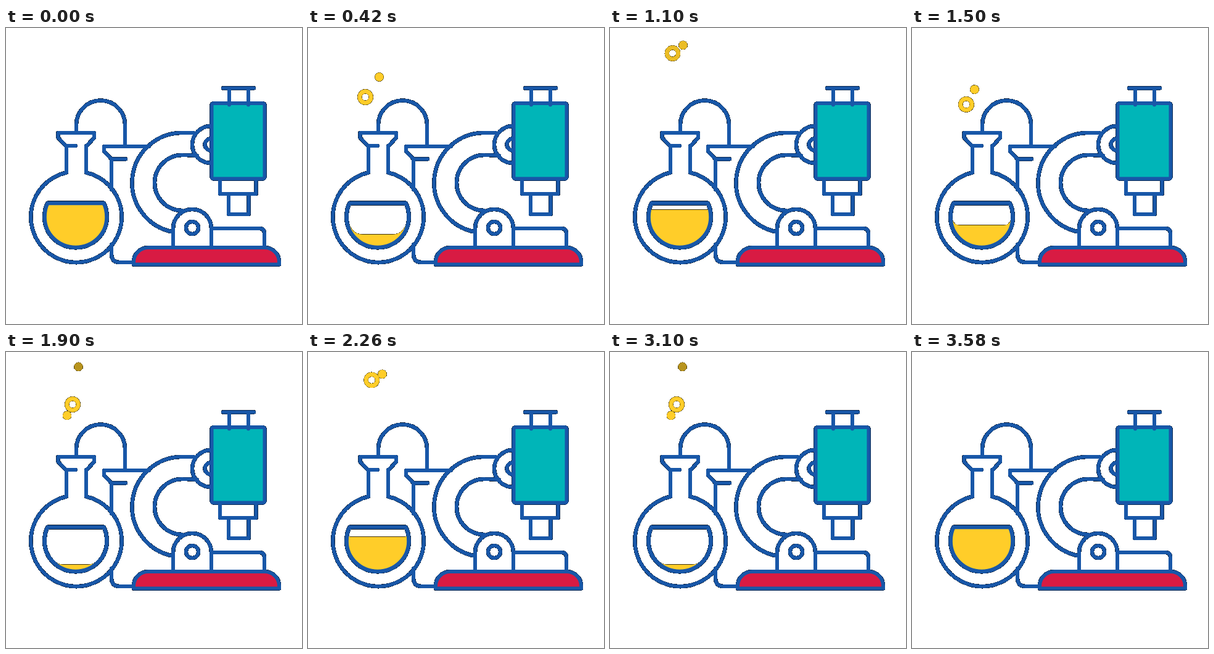
Write an HTML page that moves like this. It is 480 by 480 pixels and loops after 3600 ms.

```html
<!DOCTYPE html>
<html lang="en">
<head>
<meta charset="utf-8">
<title>Laboratory</title>
<style>
  html, body { margin: 0; width: 100%; height: 100%; overflow: hidden; background: #fff; }
  svg { display: block; width: 100vw; height: 100vh; }
  .line { fill: none; stroke: #1857a8; stroke-width: 6; stroke-linecap: round; stroke-linejoin: round; }
  .gold { fill: #ffcd29; }
  .ring { fill: none; stroke: #ffcd29; stroke-width: 7; }
</style>
</head>
<body>
<svg viewBox="0 0 480 480">
  <defs>
    <!-- hard cut-out edges: half-clear pixels sink to black, faint ones vanish -->
    <filter id="cut" filterUnits="userSpaceOnUse" x="0" y="0" width="480" height="480" color-interpolation-filters="sRGB">
      <feComponentTransfer in="SourceAlpha" result="mask">
        <feFuncA type="discrete" tableValues="0 1 1 1 1 1 1"/>
      </feComponentTransfer>
      <feMerge><feMergeNode in="mask"/><feMergeNode in="SourceGraphic"/></feMerge>
      <feComposite in2="mask" operator="in"/>
    </filter>
    <path id="bowl" d="M67.5 284H158.5Q163.5 293 163.5 307A50.5 49 0 0 1 62.5 307Q62.5 293 67.5 284Z"/>
    <clipPath id="inBowl"><use href="#bowl"/></clipPath>
    <clipPath id="leftOfBody"><path d="M280 140H333V240H280Z"/></clipPath>
  </defs>
  <g filter="url(#cut)">
    <g clip-path="url(#inBowl)"><path id="liquid" class="gold"/></g>

    <g class="line">
      <!-- tube and beaker -->
      <path d="M114 168V157A39.5 39.5 0 0 1 193 157V190"/>
      <path d="M232 192H159V200L171 212.500H194M171 213V262M171 351V366Q171 380 184 380H207"/>
      <!-- flask -->
      <path d="M113 191H97L84.500 178V170H143V178L131 191"/>
      <path d="M98 191V234.500A73.700 73.700 0 1 0 130 234.500V191"/>
      <use href="#bowl" stroke-width="6.600"/>
      <!-- arm -->
      <path d="M304 170H287A81 81 0 0 0 270 330.500M310 207Q300 206 287 206A45 45 0 0 0 285 296"/>
      <g clip-path="url(#leftOfBody)">
        <circle cx="332" cy="189" r="30"/>
        <circle cx="332" cy="189" r="9.500"/>
      </g>
      <!-- head -->
      <path d="M352 97.500H402M362 98V124M393 98V124"/>
      <rect x="333.500" y="122" width="86" height="122.500" rx="3" fill="#00b5b8"/>
      <path d="M362 122V124.500M393 122V124.500M347 247V269H405.500V247M361 269V302H393.500V269"/>
      <!-- pivot, stage, base -->
      <path d="M271 356V325A31 31 0 0 1 333 325V356M335 325H411Q419 325 419 333V354"/>
      <circle cx="302" cy="324" r="10"/>
      <path d="M207 383.500V379A24 23 0 0 1 231 356H419A24 23 0 0 1 443 379V383.500Z" fill="#d81b43"/>
    </g>

    <circle id="ring" class="ring" r="9.200"/>
    <circle id="dotA" class="gold" r="7.200"/>
    <circle id="dotB" class="gold" r="7.200"/>
  </g>
</svg>
<script>
  const CYCLE = 1200, STEP = 20, FADE = 100;
  const $ = id => document.getElementById(id);

  // rows of [ms, x, y]
  const dotPath = [[0, 89, 156], [110, 85, 135], [220, 92, 113], [280, 99, 103],
                   [420, 115.5, 79.5], [550, 122.5, 54], [700, 117.5, 24], [840, 108, -2]];
  const ringPath = [[0, 88, 155], [220, 86, 132], [420, 93, 112], [700, 108, 85],
                    [860, 110.5, 67.5], [1100, 101.5, 41], [1200, 96, 30]];

  function slope(pts, i, k) {
    const a = pts[Math.max(i - 1, 0)], b = pts[Math.min(i + 1, pts.length - 1)];
    return (b[k] - a[k]) / (b[0] - a[0]);
  }

  // cubic Hermite curve through the timed points
  function along(pts, t) {
    let i = 0;
    while (i < pts.length - 2 && t > pts[i + 1][0]) i++;
    const a = pts[i], b = pts[i + 1], span = b[0] - a[0];
    const u = Math.min((t - a[0]) / span, 1), v = 1 - u;
    return [1, 2].map(k =>
      v * v * (1 + 2 * u) * a[k] + u * u * (3 - 2 * u) * b[k] +
      span * u * v * (v * slope(pts, i, k) - u * slope(pts, i + 1, k)));
  }

  function bubble(el, pts, t, end) {
    const alpha = Math.max(0, Math.min(1, t / FADE, (end - t) / FADE));
    el.setAttribute('opacity', alpha);
    if (alpha > 0) el.setAttribute('transform', `translate(${along(pts, t)})`);
  }

  // the surface curls up at the glass as the bowl drains
  function liquidShape(t) {
    const drop = Math.min(t, CYCLE - t) / 8, y = 282.3 + drop;
    const h = Math.min(16, drop * drop / 180), top = y - h;
    const w = Math.sqrt(Math.max(0, 47.5 ** 2 - (top - 306) ** 2));
    const ctrl = w - 0.45 * h, flat = Math.max(0, w - 1.4 * h), c = 113;
    return `M58 ${top}H${c - w}Q${c - ctrl} ${y} ${c - flat} ${y}H${c + flat}` +
           `Q${c + ctrl} ${y} ${c + w} ${top}H168V362H58Z`;
  }

  function draw(now) {
    const t = Math.floor(now / STEP) * STEP % CYCLE;
    $('liquid').setAttribute('d', liquidShape(t));
    bubble($('ring'), ringPath, t, 1192);
    bubble($('dotA'), dotPath, t, 772);
    bubble($('dotB'), dotPath, t - 420, 772);
  }

  function tick() {
    draw(performance.now());
    requestAnimationFrame(tick);
  }
  tick();
</script>
</body>
</html>
```
